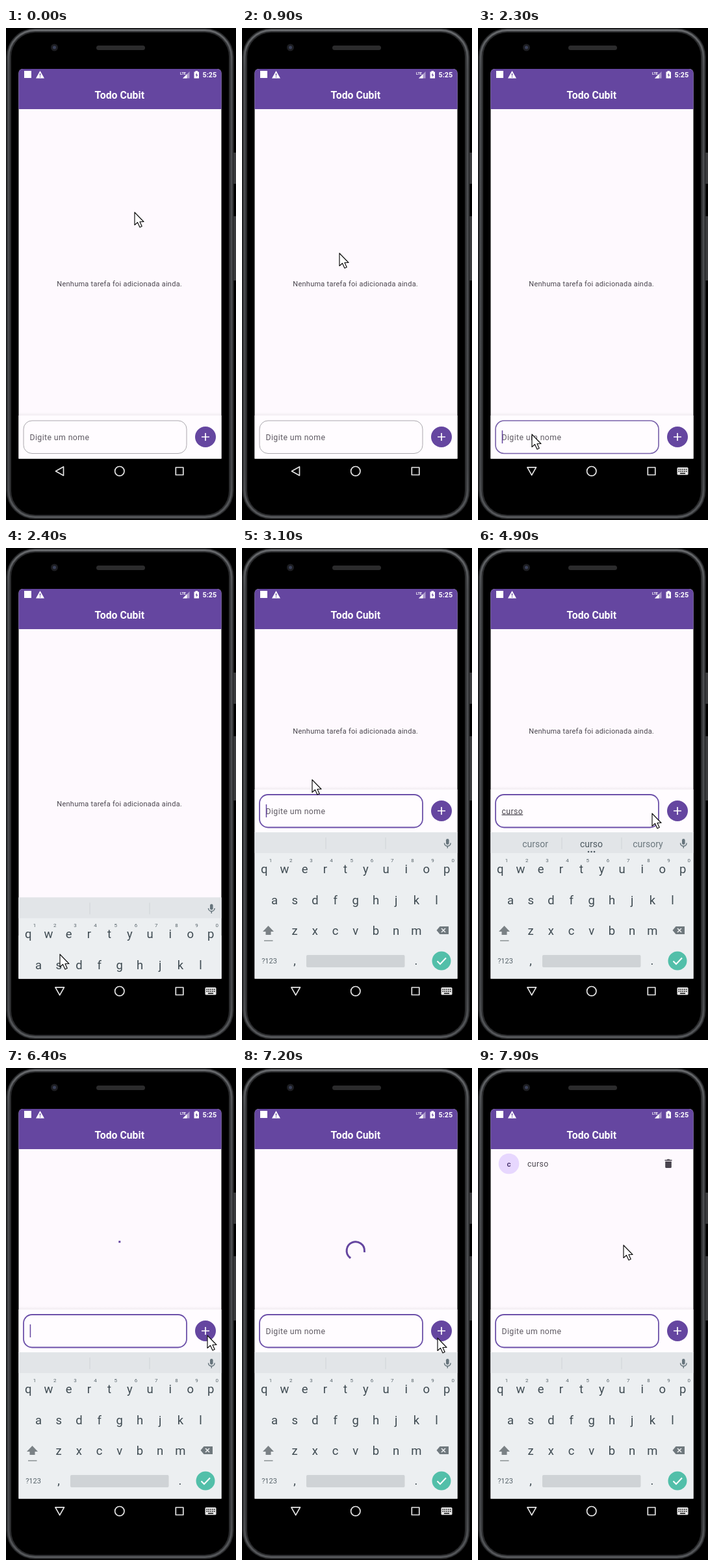
An HTML page that plays this animation: 354x758 px, repeating every 8000 ms.

```html
<!DOCTYPE html>
<html lang="pt">
<head>
<meta charset="utf-8">
<title>Todo</title>
<style>
html, body { margin: 0; width: 100%; height: 100%; overflow: hidden; background: #000; }
svg { display: block; width: 354px; height: 758px; font-family: Roboto, sans-serif; }
.mid { text-anchor: middle; }
.field { font-size: 12.3px; letter-spacing: .4px; }
.line { fill: none; stroke: #e4e4e4; stroke-width: 1.7; stroke-linejoin: round; }
.key { font-size: 18.5px; fill: #3f4b52; }
.num { font-size: 8px; fill: #59656c; }
.word { font-size: 14px; fill: #6b777e; }
</style>
</head>
<body>
<svg viewBox="0 0 354 758">
  <defs>
    <clipPath id="screen"><path d="M19.500 663.500V70q0-7 7-7H324.500q7 0 7 7V663.500z"/></clipPath>
    <linearGradient id="rim" x2="0" y2="1">
      <stop offset="0" stop-color="#66686b"/><stop offset=".08" stop-color="#4c4e51"/>
      <stop offset=".9" stop-color="#46484b"/><stop offset="1" stop-color="#55575a"/>
    </linearGradient>
    <linearGradient id="shade" x2="0" y2="1">
      <stop offset="0" stop-color="#000" stop-opacity="0"/><stop offset="1" stop-color="#000" stop-opacity=".05"/>
    </linearGradient>
  </defs>

  <!-- phone -->
  <rect width="354" height="758"/>
  <path d="M350 192h4v48h-4zM350 290h4v99h-4z" fill="#3a3b3d"/>
  <rect x=".5" y=".5" width="350" height="756" rx="44" fill="#2b2c2e"/>
  <rect x="4" y="3.500" width="343" height="750" rx="41" fill="#2b2c2e" stroke="url(#rim)" stroke-width="3"/>
  <rect x="8" y="7" width="335" height="743" rx="37"/>
  <rect x="139" y="27" width="75" height="7" rx="3.500" fill="#2b2b2c"/>
  <circle cx="74.500" cy="30" r="5.500" fill="#1d1e22"/>
  <circle cx="74.500" cy="30" r="2.500" fill="#3a4058"/>

  <g clip-path="url(#screen)">
    <rect x="19" y="63" width="313" height="601" fill="#fef9fe"/>
    <text id="empty" class="mid" x="174.700" y="398.300" font-size="11" letter-spacing=".25" fill="#49454d">Nenhuma tarefa foi adicionada ainda.</text>
    <path id="spin" fill="none" stroke="#6546a0" stroke-width="3" stroke-linecap="square"/>
    <g id="item">
      <circle cx="47.500" cy="147.500" r="15.800" fill="#e7d7fe"/>
      <text class="mid" x="47.500" y="151.500" font-size="11.500" font-weight="500" fill="#35215f">c</text>
      <text class="field" x="76" y="151.500" fill="#4a464e">curso</text>
      <path d="M287.500 141.500h3l1-1h3l1 1h3v1.600h-11zM288.200 144h9.600v8.500q0 1.500-1.500 1.500h-6.600q-1.500 0-1.500-1.500z" fill="#49444e"/>
    </g>

    <rect x="19" y="63" width="313" height="62" fill="#6546a0"/>
    <text class="mid" x="174.800" y="109.200" font-size="15.800" font-weight="700" fill="#fff">Todo Cubit</text>
    <g fill="#fff">
      <rect x="28" y="66" width="11" height="11"/>
      <path d="M52.500 66l6.500 11.500h-13z"/>
      <path d="M52.500 70v3.500M52.500 74.700v1.300" stroke="#6546a0" stroke-width="1.400"/>
      <path d="M282.500 67v10.500h-10.500z" opacity=".45"/>
      <path d="M278.500 71v6.500h-6.500z"/>
      <text x="268" y="71.500" font-size="5.500" font-weight="700">LTE</text>
      <path d="M289.500 67.500h2v-1.500h3.500v1.500h2v10h-7.500z"/>
      <path d="M293.700 69l-2 3.800h1.500v2.900l2-3.800h-1.500z" fill="#6546a0"/>
      <text x="302.500" y="76" font-size="10.800" font-weight="700">5:25</text>
    </g>

    <g id="bar">
      <rect x="19" y="592" width="313" height="5" fill="url(#shade)"/>
      <rect x="19" y="597" width="313" height="67" fill="#fffcff"/>
      <rect id="box" x="27" y="605" width="251" height="50.500" rx="13" fill="none"/>
      <text id="hint" class="field" x="36.500" y="634.500" fill="#5f5a63">Digite um nome</text>
      <text id="typed" class="field" x="36.500" y="634.500" fill="#49454d" text-decoration="underline"></text>
      <rect id="caret" y="620" width="1.500" height="20" fill="#6546a0"/>
      <circle cx="307" cy="630" r="16" fill="#6546a0"/>
      <path d="M301 630h12M307 624v12" stroke="#fff" stroke-width="1.700"/>
    </g>

    <g id="keyboard">
      <rect x="19" y="438" width="313" height="226" fill="#eceff1"/>
      <rect x="19" y="438" width="313" height="32" fill="#e2e5e8"/>
      <path d="M129 446v18M221 446v18" stroke="#d0d4d7"/>
      <g id="words">
        <text class="mid word" x="88" y="461"></text>
        <text class="mid word" x="174.500" y="461" style="fill:#4c585f"></text>
        <text class="mid word" x="261.500" y="461"></text>
        <path d="M170 468h.1M174.500 468h.1M179 468h.1" stroke="#4c585f" stroke-width="2.500" stroke-linecap="round"/>
      </g>
      <rect x="314" y="448" width="4.600" height="9" rx="2.300" fill="#66747c"/>
      <path d="M311.500 454.500a4.800 4.800 0 0 0 9.600 0M316.300 459.500v3" fill="none" stroke="#66747c" stroke-width="1.500"/>
      <g id="keys"></g>
      <path d="M40.500 582l8.500 9h-4.500v5h-8v-5h-4.500z" fill="#7a8185"/>
      <path d="M34 605h13.500" stroke="#8b9295" stroke-width="1.500"/>
      <path d="M299.500 589l5-6h13.500v12h-13.500z" fill="#6f787d"/>
      <path d="M307 586l6 6M313 586l-6 6" stroke="#eceff1" stroke-width="1.500"/>
      <text class="mid" x="42" y="640" font-size="11" fill="#59656c">?123</text>
      <rect x="99" y="627" width="151.500" height="19" rx="2" fill="#cfd3d6"/>
      <circle cx="307" cy="636" r="14.500" fill="#52bfa9"/>
      <path d="M300.500 636.500l4.500 4.500 9-9.500" fill="none" stroke="#fff" stroke-width="2"/>
    </g>
  </g>

  <!-- navigation -->
  <path id="back" class="line" d="M76.500 682.700l12-6.800v13.600z"/>
  <circle class="line" cx="174.800" cy="682.700" r="7.200"/>
  <rect class="line" x="261.300" y="677" width="11.500" height="11.500"/>
  <g id="switch">
    <rect x="306.500" y="677" width="17" height="11.500" rx="1.500" fill="#e6e6e6"/>
    <path d="M308.500 680h13M308.500 683h13" stroke="#000" stroke-width="1.500" stroke-dasharray="1.600 1.250"/>
    <path d="M311 686.200h8" stroke="#000" stroke-width="1.400"/>
  </g>

  <path id="mouse" d="M0 0V19.500L4.500 15.500 8 23 11.200 21.500 8 14.500H14z" fill="#fff" stroke="#111" stroke-width="1.200" stroke-linejoin="round"/>
</svg>
<script>
const LOOP = 8000, STEP = 100;
const FOCUS = 2200, RESIZE = 2500, SUBMIT = 6400, LOADED = 7300;
const typing = [3600, 3700, 3900, 4000, 4200];
const guesses = ["can c come", "cut cu cup", "cure cur curl", "curse curs cursor", "cursor curso cursory"];
const mousePath = [
  [0, 198, 284], [200, 198, 284], [900, 150, 347], [1000, 150, 347], [1100, 107, 437], [1200, 107, 437],
  [1900, 83, 626], [2700, 83, 626], [3100, 108, 357], [4500, 108, 357], [4900, 268, 409], [5400, 310, 412],
  [7000, 310, 412], [7200, 301, 416], [7900, 224, 273], [LOOP, 224, 273]
];

const $ = id => document.getElementById(id);
const set = (id, name, value) => $(id).setAttribute(name, value);
const show = (id, on) => set(id, "opacity", +on);
const shift = (id, x, y) => set(id, "transform", `translate(${x} ${y})`);
const clamp = v => Math.min(1, Math.max(0, v));

function label(cls, x, y, text) {
  return `<text class="mid ${cls}" x="${x}" y="${y}">${text}</text>`;
}

function buildKeys() {
  const rows = [["qwertyuiop", 34.3, 501], ["asdfghjkl", 50, 548.5], ["zxcvbnm", 81.2, 595.5]];
  let out = label("key", 81, 642, ",") + label("key", 268, 642, ".");
  for (const [chars, x, y] of rows)
    [...chars].forEach((c, i) => out += label("key", x + i * 31.2, y, c));
  for (let i = 0; i < 10; i++) out += label("num", 44 + i * 31.2, 484, (i + 1) % 10);
  $("keys").innerHTML = out;
}

function mouseAt(t) {
  const i = mousePath.findIndex(p => p[0] > t);
  const [t0, x0, y0] = mousePath[i - 1], [t1, x1, y1] = mousePath[i];
  const k = (t - t0) / (t1 - t0);
  return [x0 + (x1 - x0) * k, y0 + (y1 - y0) * k];
}

// cubic-bezier(.4, 0, .2, 1)
function ease(x) {
  let lo = 0, hi = 1, u = .5;
  for (let i = 0; i < 20; i++) {
    u = (lo + hi) / 2;
    const bx = 1.2 * u * (1 - u) ** 2 + .6 * u * u * (1 - u) + u ** 3;
    if (bx < x) lo = u; else hi = u;
  }
  return 3 * u * u * (1 - u) + u ** 3;
}

function spinner(t) {
  const p = t / 1333 % 1, full = Math.PI * 1.5, r = 13.7;
  const head = ease(clamp(p * 2)) * full, tail = ease(clamp(p * 2 - 1)) * full;
  const from = -Math.PI / 2 + tail + t / 2222 * 2 * Math.PI + p * Math.PI / 2;
  const sweep = Math.max(head - tail, .001);
  const at = a => `${174.8 + r * Math.cos(a)} ${281.5 + r * Math.sin(a)}`;
  return `M${at(from)}A${r} ${r} 0 ${+(sweep > Math.PI)} 1 ${at(from + sweep)}`;
}

function caretOn(t) {
  if (t < FOCUS) return false;
  const start = [2100, ...typing, SUBMIT].filter(s => s <= t).pop();
  return Math.floor((t - start) / 500) % 2 === 0;
}

function draw(t) {
  const focused = t >= FOCUS, raised = t >= RESIZE;
  const glow = clamp((t - FOCUS + STEP) / 250);
  const count = t < SUBMIT ? typing.filter(s => s <= t).length : 0;

  shift("mouse", ...mouseAt(t));
  shift("bar", 0, raised ? -225 : 0);
  shift("empty", 0, raised ? -112.5 : 0);
  shift("keyboard", 0, 226 * (1 - clamp((t - 2300) / 300)) ** 2);
  show("keyboard", t >= 2400);
  show("switch", focused);
  set("back", "transform", focused ? "rotate(-90 82.7 682.7)" : "");
  $("box").style.stroke = `color-mix(in srgb, #6c50a9 ${glow * 100}%, #aaa7ad)`;
  set("box", "stroke-width", 1 + glow * .8);

  $("typed").textContent = "curso".slice(0, count);
  set("hint", "opacity", t >= SUBMIT ? clamp((t - SUBMIT) / 200) : +!count);
  set("caret", "x", count ? 37 + $("typed").getComputedTextLength() : 36.7);
  show("caret", caretOn(t));
  show("words", count > 0);
  if (count) guesses[count - 1].split(" ").forEach((w, i) => $("words").children[i].textContent = w);

  show("empty", t < SUBMIT);
  show("spin", t >= SUBMIT && t < LOADED);
  set("spin", "d", spinner(Math.max(0, t - SUBMIT)));
  show("item", t >= LOADED);
}

function frame() {
  draw(Math.floor(performance.now() % LOOP / STEP) * STEP);
  requestAnimationFrame(frame);
}

buildKeys();
frame();
</script>
</body>
</html>
```
